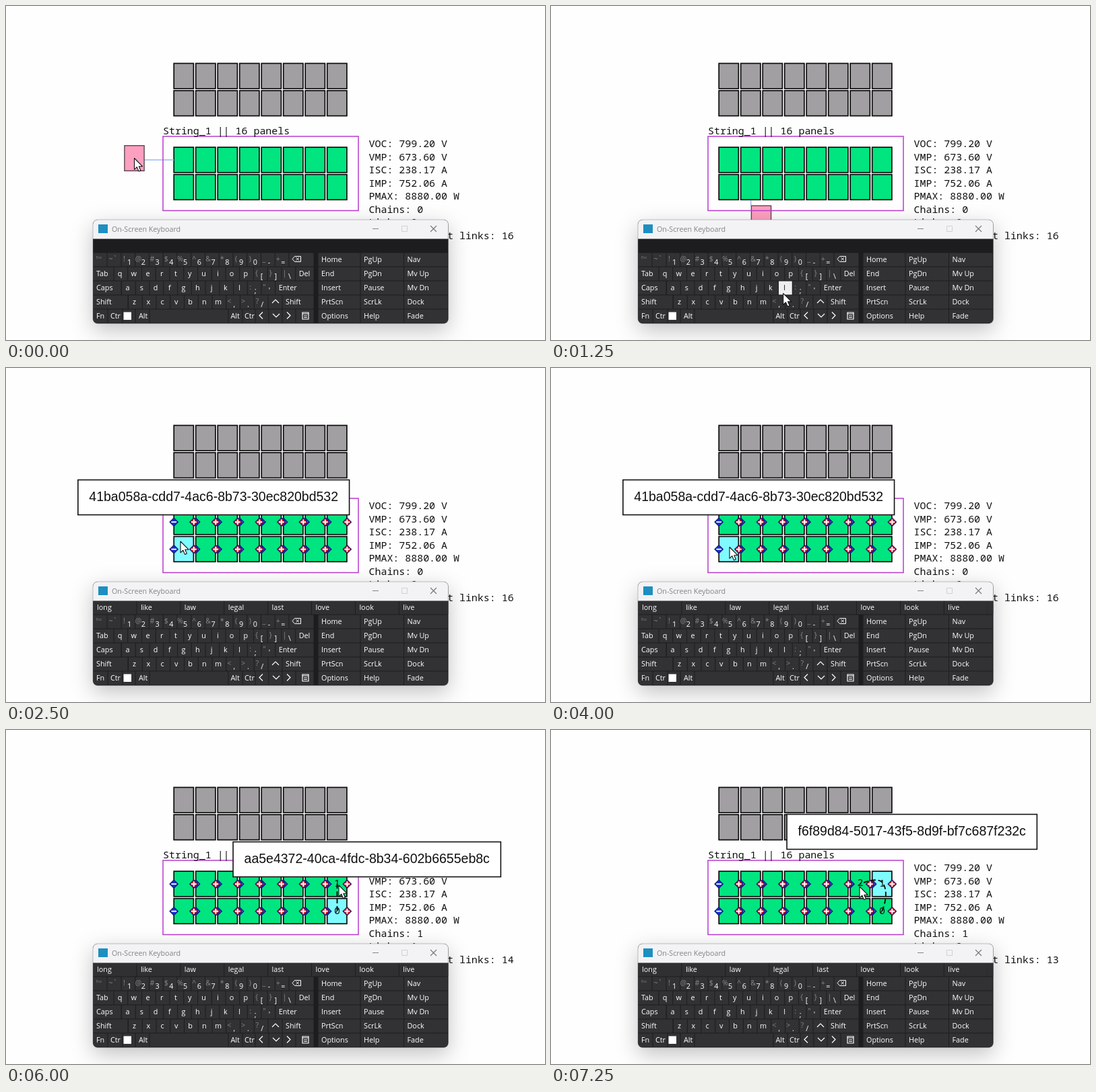
These frames come from a looping animation (800x497 px, 8000 ms). An HTML page:

```html
<!DOCTYPE html>
<html lang="en">
<head>
<meta charset="utf-8">
<title>Panel string editor</title>
<style>
  html, body { margin: 0; width: 100%; height: 100%; overflow: hidden; background: #fffeff; }
  svg { display: block; width: 800px; height: 497px; }
  text { white-space: pre; }
  .mono { font: 14.95px "Noto Sans Mono", monospace; fill: #111; }
  .tip { font: 19.5px "Liberation Sans", Arial, sans-serif; fill: #111; }
  .ui { font: 10.8px "Open Sans", sans-serif; fill: #fff; }
  .dim { fill: #858488; }
  .mid { text-anchor: middle; }
  .panel { stroke: #0b0b0b; stroke-width: 1.7; }
  .window { filter: drop-shadow(0 10px 16px rgba(0, 0, 0, .24)); }
</style>
</head>
<body>
<svg id="stage" viewBox="0 0 800 497" xmlns="http://www.w3.org/2000/svg"></svg>
<script>
const LOOP = 8000, STEP = 50;
const COLS = 8, PITCH = 32.5, LEFT = 249.2, PANEL_W = 29.2, PANEL_H = 37.6;
const GRAY_ROWS = [85.4, 125.9], ROWS = [210.2, 250.7];
const GREEN = '#00e57f', CYAN = '#7ffbff';

const rect = (x, y, w, h, attrs) => `<rect x="${x}" y="${y}" width="${w}" height="${h}" ${attrs}/>`;
const text = (x, y, s, cls, attrs = '') => `<text x="${x}" y="${y}" class="${cls}" ${attrs}>${
  String(s).replace(/&/g, '&amp;').replace(/</g, '&lt;')}</text>`;
const line = (d, attrs) => `<path d="${d}" fill="none" ${attrs}/>`;
const grid = (rows, fn) => rows.map((y, r) =>
  Array.from({ length: COLS }, (_, c) => fn(LEFT + c * PITCH, y, r, c)).join('')).join('');
const panel = (x, y, attrs) => rect(x, y, PANEL_W, PANEL_H, attrs);

const diamond = (x, y, color, sign) =>
  `<path d="M${x - 6.2} ${y}l6.2 -6.2l6.2 6.2l-6.2 6.2z" fill="${color}" stroke="#17176b" stroke-width="1.1"/>` +
  line(`M${x - 3.8} ${y}h7.6` + (sign === '+' ? `M${x} ${y - 3.8}v7.6` : ''), 'stroke="#fff" stroke-width="1.9"');

function scene() {
  const stats = ['VOC: 799.20 V', 'VMP: 673.60 V', 'ISC: 238.17 A', 'IMP: 752.06 A',
    'PMAX: 8880.00 W', 'Chains: 0', 'Links: 0', 'Panels without links: 16'];
  return grid(GRAY_ROWS, (x, y) => panel(x, y, 'class="panel" fill="#a29fa2"')) +
    grid(ROWS, (x, y, r, c) => panel(x, y, `class="panel" id="p${r}${c}" fill="${GREEN}"`)) +
    '<g id="ghost">' +
      line('', 'id="wire" stroke="#98b9f5" stroke-width="1.5"') +
      panel(0, 0, 'id="drag" fill="#fda0c0" stroke="#5b474f" stroke-width="1.4"') +
    '</g>' +
    rect(233, 194, 290, 110.5, 'fill="none" stroke="#b93bd0" stroke-width="1.5"') +
    text(233, 191, 'String_1 || 16 panels', 'mono') +
    stats.map((s, i) => text(538.5, 210 + i * 19.5, s, 'mono', `id="stat${i}"`)).join('') +
    '<g id="ports">' +
      grid(ROWS, (x, y) => diamond(x, y + 19, '#1230d8', '-')) +
      grid(ROWS, (x, y) => diamond(x + PANEL_W + .4, y + 19, '#dd1722', '+')) +
    '</g>' +
    line('', 'id="chain" stroke="#0a0a0a" stroke-width="1.9" stroke-dasharray="7 4"') +
    [[491.5, 274], [491.5, 233], [459, 232]].map(([x, y], i) =>
      text(x, y, i, 'mono mid', `id="node${i}"`)).join('') +
    '<g id="tip">' + rect(0, 0, 0, 52, 'id="tipBox" fill="#fff" stroke="#111" stroke-width="1.6"') +
      text(0, 0, '', 'tip mid', 'id="tipText"') + '</g>' +
    keyboard() +
    '<path id="cursor" d="M0 0V16.8L3.8 13.2L6.5 19.4L9.4 18.2L6.8 12.2H12Z" fill="#fff" stroke="#111" stroke-width="1.1" stroke-linejoin="round"/>';
}

function keyboard() {
  const top = row => 367 + row * 21;
  const cap = (x0, x1, row, id = '') => rect(x0 + .5, top(row) + .5, x1 - x0 - 1, 20, `fill="#323134" ${id}`);
  const word = (x0, x1, row, s, x = x0 + 5) => cap(x0, x1, row) + text(x, top(row) + 13.7, s, 'ui');
  const W = 20.75;

  // One-character entries are letters; two characters are the shifted and plain symbols.
  const run = (x, row, keys) => keys.split(' ').map((k, i) => {
    const a = x + i * W, hot = k === 'l';
    const label = k.length === 1
      ? text(a + 9, top(row) + 14, k, 'ui mid', hot ? 'id="hotText"' : '')
      : text(a + 4.5, top(row) + 13, k[0], 'ui dim mid') + text(a + 12, top(row) + 17.5, k[1], 'ui mid');
    return cap(a, a + W, row, hot ? 'id="hotKey"' : '') + label;
  }).join('');

  const chevron = (x, y, d) => line(`M${x} ${y}${d}`, 'stroke="#fff" stroke-width="1.2"');
  const pad = ['Home PgUp Nav', 'End PgDn Mv_Up', 'Insert Pause Mv_Dn', 'PrtScn ScrLk Dock', 'Options Help Fade'];
  const padX = [463, 526, 590.5, 656];
  const words = ['long', 'like', 'law', 'legal', 'last', 'love', 'look', 'live'];

  return '<clipPath id="frame">' + rect(129, 318, 527.5, 154.5, 'rx="7"') + '</clipPath>' +
    rect(129, 318, 527.5, 154.5, 'rx="7" fill="#1d1c1f" class="window"') +
    '<g clip-path="url(#frame)">' +
    rect(129, 318, 528, 28.5, 'fill="#f3f2f4"') +
    rect(137, 325, 14, 13, 'fill="#1d8fc0"') +
    text(157, 336, 'On-Screen Keyboard', 'ui', 'style="fill:#858388;font-size:10.7px"') +
    line('M544 331.5h9', 'stroke="#858388"') +
    line('M587.5 327.5h8v8h-8z', 'stroke="#d2d0d4"') +
    line('M630 327l9 9m0 -9l-9 9', 'stroke="#77757a" stroke-width="1.1"') +
    '<g id="words">' + words.map((s, i) =>
      rect(129.5 + i * 64.9, 347, 64, 19.5, 'fill="#302f32"') +
      text(135 + i * 64.9, 360, s, 'ui')).join('') + rect(648, 347, 9, 19.5, 'fill="#302f32"') + '</g>' +
    cap(129, 150, 0) + text(134, 376, 'Esc', 'ui dim', 'style="font-size:5.5px"') +
    cap(150, 171, 0) + text(152.5, 380, '~`', 'ui dim') +
    run(171, 0, '!1 @2 #3 $4 %5 ^6 &7 *8 (9 )0 _- +=') + cap(420, 457, 0) +
    line('M425 376.5l3.5 -4h9v8h-9zM430.5 374.2l4.5 4.5m0 -4.5l-4.5 4.5', 'stroke="#fff"') +
    word(129, 160, 1, 'Tab') + run(160, 1, 'q w e r t y u i o p {[ }] |\\') + word(429.7, 457, 1, 'Del') +
    word(129, 171, 2, 'Caps') + run(171.5, 2, `a s d f g h j k l :; "'`) + word(399.7, 457, 2, 'Enter') +
    word(129, 181, 3, 'Shift') + run(181.5, 3, 'z x c v b n m <, >. ?/') +
    cap(389, 410, 3) + chevron(395, 442, 'l5 -5l5 5') + word(410, 457, 3, 'Shift') +
    word(129, 151, 4, 'Fn') + word(151, 173, 4, 'Ctr', 155) + cap(173, 192, 4) + rect(174.5, 455.5, 11.5, 11.5, 'fill="#fff"') +
    word(192, 213, 4, 'Alt') + cap(213, 330, 4) + word(330, 351, 4, 'Alt', 333.5) + word(351, 370, 4, 'Ctr', 354) +
    cap(370, 390, 4) + chevron(381, 455.5, 'l-5 5l5 5') +
    cap(390, 410, 4) + chevron(396, 458, 'l5 5l5 -5') +
    cap(410, 430, 4) + chevron(417, 455.5, 'l5 5l-5 5') +
    cap(430, 457, 4) + line('M440 456h9v10h-9zM440 458h9M442 461h5M442 463.5h5', 'stroke="#fff" stroke-width="1.2"') +
    pad.map((r, i) => r.split(' ').map((s, j) =>
      word(padX[j], padX[j + 1], i, s.replace('_', ' '))).join('')).join('') +
    '</g>' + rect(129, 318, 527.5, 154.5, 'rx="7" fill="none" stroke="#77757a" stroke-opacity=".55" stroke-width=".8"');
}

document.getElementById('stage').innerHTML = scene();
const $ = id => document.getElementById(id);
const set = (id, attrs) => { for (const k in attrs) $(id).setAttribute(k, attrs[k]); };
const show = (id, on) => set(id, { visibility: on ? 'visible' : 'hidden' });

// time, x, y
const PATH = [
  [0, 190.5, 226.5], [50, 190.5, 226.5], [200, 212, 268], [350, 312, 316], [600, 344.7, 427.7],
  [1650, 344.7, 427.7], [1800, 346, 419], [2000, 346, 419], [2100, 330, 362], [2250, 288, 272],
  [2400, 262, 233], [2450, 260, 241], [2500, 259, 258], [2650, 259, 265], [3100, 259, 265],
  [3150, 265, 266.5], [4000, 265, 266.5], [4200, 494, 266], [5200, 494, 266], [5500, 494, 231],
  [6550, 494, 231], [7000, 458, 233], [LOOP, 458, 233]
];
// start, row, column, label
const TIPS = [
  [2350, 0, 0, '5e90b2d7-63a8-4b1e-9d05-a27e4c816f3b'],
  [2500, 1, 0, '41ba058a-cdd7-4ac6-8b73-30ec820bd532'],
  [4700, 1, 7, 'aa5e4372-40ca-4fdc-8b34-602b6655eb8c'],
  [6100, 0, 7, 'f6f89d84-5017-43f5-8d9f-bf7c687f232c']
];
const CHAINS = ['', 'M491.5 269V229', 'M491.5 269C497 256 500 238 492 227C486 220 471 224 459 229'];

function pointer(t) {
  const i = Math.max(1, PATH.findIndex(p => p[0] >= t));
  const [t0, x0, y0] = PATH[i - 1], [t1, x1, y1] = PATH[i];
  const k = (t - t0) / (t1 - t0);
  return [x0 + (x1 - x0) * k, y0 + (y1 - y0) * k];
}

function drawGhost(t) {
  const [cx, cy] = pointer(Math.min(t, 350));
  const x = cx - PANEL_W / 2, y = cy - PANEL_H / 2;
  set('drag', { x, y });
  let d = '';
  if (x + PANEL_W < LEFT) {
    const row = cy < 249 ? 229 : 269.5;
    d = `M${x + PANEL_W} ${row}H${LEFT}`;
  } else if (y > 289) {
    const col = Math.max(0, Math.round((x - LEFT - 15) / PITCH));
    d = `M${LEFT + 15 + col * PITCH} 289V${y}`;
  }
  set('wire', { d });
}

let hovered = null;
function drawTip(t) {
  const tip = TIPS.filter(s => s[0] <= t).pop();
  show('tip', tip);
  if (hovered === tip) return;
  if (hovered) set(`p${hovered[1]}${hovered[2]}`, { fill: GREEN });
  hovered = tip;
  if (!tip) return;
  const [, r, c, label] = tip;
  const mid = LEFT + c * PITCH + 59, y = r ? 166.5 : 125.5;
  set(`p${r}${c}`, { fill: CYAN });
  $('tipText').textContent = label;
  set('tipText', { x: mid, y: y + 31.5 });
  const w = $('tipText').getComputedTextLength() + 33;
  set('tipBox', { x: mid - w / 2, y, width: w });
}

function draw(now) {
  const t = Math.floor(now % LOOP / STEP) * STEP;
  const [x, y] = pointer(t);
  set('cursor', { transform: `translate(${x} ${y})` });
  drawGhost(t);
  show('ghost', t < 1700);
  show('ports', t >= 1700);
  show('words', t >= 1750);

  const hot = t >= 550 && t < 2050;
  set('hotKey', { fill: hot ? '#eeedef' : '#323134' });
  $('hotText').style.fill = hot ? '#111' : '#fff';
  drawTip(t);

  const links = t >= 7150 ? 2 : t >= 5700 ? 1 : 0;
  set('chain', { d: CHAINS[links] });
  for (let i = 0; i < 3; i++) show(`node${i}`, links && i <= links);
  $('stat5').textContent = `Chains: ${links ? 1 : 0}`;
  $('stat6').textContent = `Links: ${links}`;
  $('stat7').textContent = `Panels without links: ${links ? 15 - links : 16}`;
}

const start = performance.now();
function tick() {
  draw(performance.now() - start);
  requestAnimationFrame(tick);
}
tick();
</script>
</body>
</html>
```
